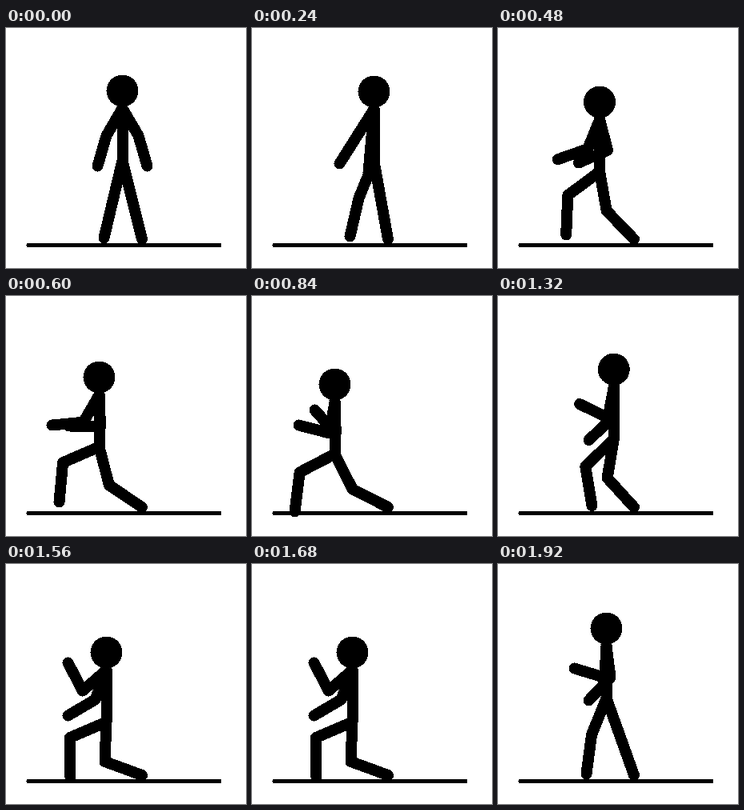
Recreate the animation shown at these times as an HTML page. Size 300 by 300 pixels, loop 2040 ms.

```html
<!DOCTYPE html>
<html lang="en">
<head>
<meta charset="utf-8">
<title>Stick figure lunges</title>
<style>
  html, body { margin: 0; width: 100%; height: 100%; overflow: hidden; background: #fff; }
  svg { display: block; width: 100%; height: 100%; shape-rendering: crispEdges; }
  path { fill: none; stroke: #000; stroke-linecap: round; stroke-linejoin: round; }
</style>
</head>
<body>
<svg viewBox="0 0 300 300">
  <g transform="translate(.5 .5)">
    <path d="M27.5 271H266.5" stroke-width="5"/>
    <path id="body" stroke-width="14"/>
    <circle id="head" r="20"/>
  </g>
</svg>
<script>
const STEP_MS = 120, STEPS = 17;
const ARM = 39.5, LEG = 49.5, TORSO = 67, HEAD = 20, SHOULDER = 2;
const BACK_FOOT = [169.5, 263.5]; // planted for the whole loop

const pose = (step, neck, frontFoot, frontHand, backHand) =>
  ({ step, neck, frontFoot, frontHand, backHand });

const kneel = pose(13, [125, 130], [80, 266], [77, 123], [77, 189]);
const poses = [
  pose(0, [145, 98], [122, 262], [114, 172], [176, 172]),
  pose(2, [152, 99], [122, 260], [109, 169], [145, 180]),
  pose(5, [116, 121], [66, 257], [57, 161], [78, 162]),
  pose(7, [103, 130], [53, 269], [58, 161], [78, 142]),
  pose(9, [171, 98.5], [154, 257], [126, 146], [149, 170]),
  kneel,
  { ...kneel, step: 14 },
  pose(16, [135, 100], [110, 262], [95, 130], [113, 170])
];

const body = document.getElementById("body");
const head = document.getElementById("head");

const mix = (a, b, t) => a.map((v, i) => v + (b[i] - v) * t);
const below = ([x, y], distance) => [x, y + distance];

// Two equal bones from start to end; side is the direction of the middle joint.
function limb(start, end, bone, side) {
  const dx = end[0] - start[0], dy = end[1] - start[1];
  const reach = Math.hypot(dx, dy);
  const bend = side * Math.sqrt(Math.max(0, bone ** 2 - reach ** 2 / 4)) / reach;
  const [midX, midY] = mix(start, end, 0.5);
  return [start, [midX + dy * bend, midY - dx * bend], end];
}

// The hip swings in an arc around the planted foot.
function hipPolar(neck) {
  const [x, y] = below(neck, TORSO);
  const dx = x - BACK_FOOT[0], dy = y - BACK_FOOT[1];
  return [Math.hypot(dx, dy), Math.atan2(dy, dx)];
}

function linesAt(step) {
  const b = poses.find(p => p.step > step) || poses.at(-1);
  const a = poses.findLast(p => p.step <= step);
  const t = a === b ? 0 : (step - a.step) / (b.step - a.step);
  const between = part => mix(a[part], b[part], t);

  const [radius, angle] = mix(hipPolar(a.neck), hipPolar(b.neck), t);
  const hip = [
    BACK_FOOT[0] + radius * Math.cos(angle),
    BACK_FOOT[1] + radius * Math.sin(angle)
  ];
  const neck = below(hip, -TORSO);
  const shoulder = below(neck, SHOULDER);
  // The front elbow points outward at first, then backward once turned.
  const frontElbow = Math.min(1, step - 1);

  return [
    [neck, hip],
    limb(shoulder, between("frontHand"), ARM, frontElbow),
    limb(shoulder, between("backHand"), ARM, 1),
    limb(hip, between("frontFoot"), LEG, -1),
    limb(hip, BACK_FOOT, LEG, -1)
  ];
}

function draw() {
  const lines = linesAt(Math.floor(performance.now() / STEP_MS) % STEPS);
  const [x, y] = lines[0][0];
  body.setAttribute("d", lines.map(points => "M" + points.join("L")).join(""));
  head.setAttribute("cx", x);
  head.setAttribute("cy", y - HEAD);
  requestAnimationFrame(draw);
}
draw();
</script>
</body>
</html>
```
